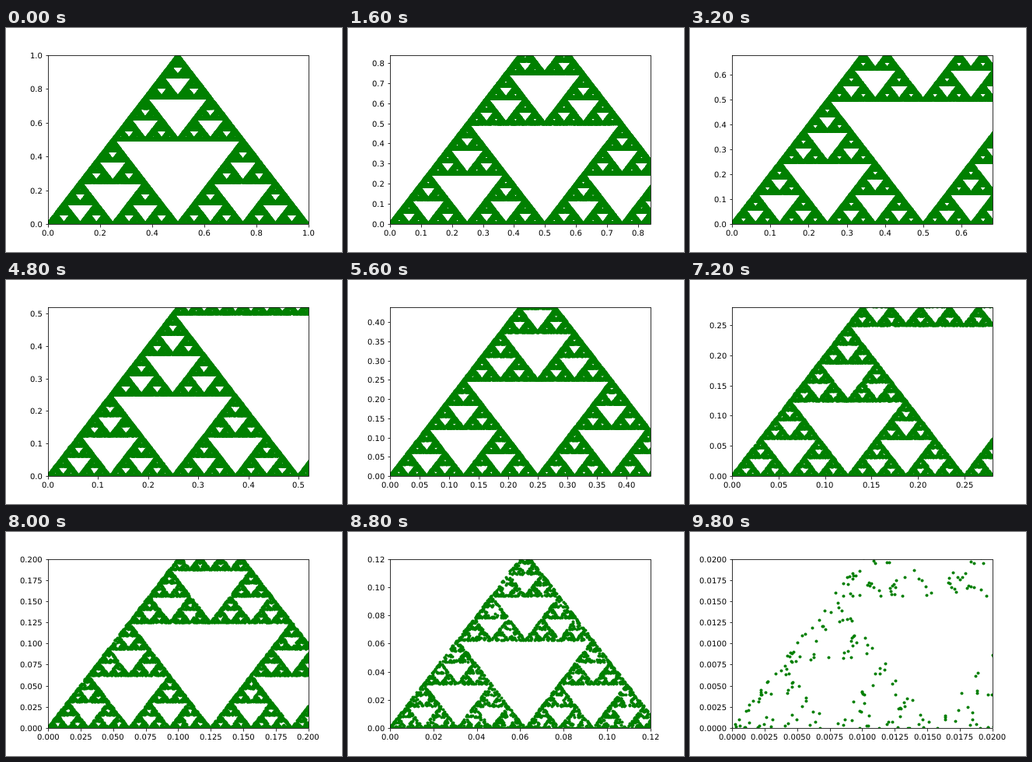
Animation, 432 px wide and 288 px high, one loop 10000 ms. Source, as an HTML page with a canvas:

```html
<!DOCTYPE html>
<html lang="en">
<head>
<meta charset="utf-8">
<title>Zoom into a Sierpinski triangle</title>
<style>
  html, body { margin: 0; width: 100%; height: 100%; overflow: hidden; background: #fff; }
  canvas { display: block; }
</style>
</head>
<body>
<canvas id="plot" width="432" height="288"></canvas>
<script>
const STEPS = 50, STEP_MS = 200, POINTS = 100000, MAX_OVERLAP = 12;
const LEFT = 54, TOP = 35, RIGHT = 389, BOTTOM = 252;
const SPAN_X = 334.8, SPAN_Y = 217.44, LINE = 0.8;

const ctx = document.getElementById('plot').getContext('2d', { willReadFrequently: true });

function seededRandom(seed) {
  return () => {
    seed = (seed + 0x6D2B79F5) | 0;
    let t = Math.imul(seed ^ (seed >>> 15), 1 | seed);
    t = (t + Math.imul(t ^ (t >>> 7), 61 | t)) ^ t;
    return ((t ^ (t >>> 14)) >>> 0) / 4294967296;
  };
}

// Chaos game: jump halfway to a random corner again and again.
function chaosGame(count) {
  const corners = [[0, 0], [0.5, 1], [1, 0]];
  const random = seededRandom(7);
  const xs = new Float64Array(count), ys = new Float64Array(count);
  let x = 0, y = 0;
  for (let i = 0; i < count; i++) {
    const [cx, cy] = corners[Math.floor(random() * 3)];
    xs[i] = x = (x + cx) / 2;
    ys[i] = y = (y + cy) / 2;
  }
  return { xs, ys };
}

function makeDot() {
  const dot = document.createElement('canvas');
  dot.width = dot.height = 5;
  const c = dot.getContext('2d', { willReadFrequently: true });
  c.fillStyle = 'green';
  c.arc(2.5, 2.5, 2, 0, 2 * Math.PI);
  c.fill();
  return dot;
}

const { xs, ys } = chaosGame(POINTS);
const dot = makeDot();

const toX = (v, limit) => Math.round(LEFT + v / limit * SPAN_X);
const toY = (v, limit) => Math.round(BOTTOM - v / limit * SPAN_Y);

function drawPoints(limit) {
  // Dots sit on whole pixels; extra copies only harden their soft edges.
  const copies = new Uint16Array(432 * 288);
  const margin = limit * 1.01;
  ctx.save();
  ctx.beginPath();
  ctx.rect(LEFT, TOP, RIGHT - LEFT, BOTTOM - TOP);
  ctx.clip();
  for (let i = 0; i < POINTS; i++) {
    if (xs[i] > margin || ys[i] > margin) continue;
    const px = toX(xs[i], limit), py = toY(ys[i], limit);
    if (copies[py * 432 + px]++ < MAX_OVERLAP) ctx.drawImage(dot, px - 3, py - 2);
  }
  ctx.restore();
}

// Smallest round step giving at most nine intervals.
function tickStep(limit) {
  const raw = limit / 9;
  const exponent = Math.floor(Math.log10(raw));
  const base = [1, 2, 2.5, 5, 10].find(b => Number(b + 'e' + exponent) >= raw);
  const step = Number(base + 'e' + exponent);
  return { step, decimals: (String(step).split('.')[1] || '').length };
}

function drawAxes(limit) {
  ctx.fillStyle = ctx.strokeStyle = '#000';
  ctx.lineWidth = LINE;
  ctx.strokeRect(LEFT + 0.5, TOP + 0.5, RIGHT - LEFT, BOTTOM - TOP);

  ctx.font = '10px "DejaVu Sans", sans-serif';
  ctx.textRendering = 'geometricPrecision';
  const { step, decimals } = tickStep(limit);
  const inset = (1 - LINE) / 2;
  for (let i = 0; i * step <= limit + 1e-9; i++) {
    const value = i * step, label = value.toFixed(decimals);
    const width = ctx.measureText(label).width;
    const px = toX(value, limit), py = toY(value, limit);
    ctx.fillRect(px + inset, BOTTOM + 1, LINE, 3.5);
    ctx.fillRect(LEFT - 2.5, py + inset, 2.5, LINE);
    ctx.fillText(label, Math.round(LEFT + value / limit * SPAN_X - width / 2), 267);
    ctx.fillText(label, Math.round(47 - width), py + 4);
  }
}

let shown = -1;
function frame() {
  const index = Math.floor(performance.now() / STEP_MS) % STEPS;
  if (index !== shown) {
    shown = index;
    const limit = 1 - 0.02 * index;
    ctx.fillStyle = '#fff';
    ctx.fillRect(0, 0, 432, 288);
    drawPoints(limit);
    drawAxes(limit);
  }
  requestAnimationFrame(frame);
}
frame();
</script>
</body>
</html>
```
